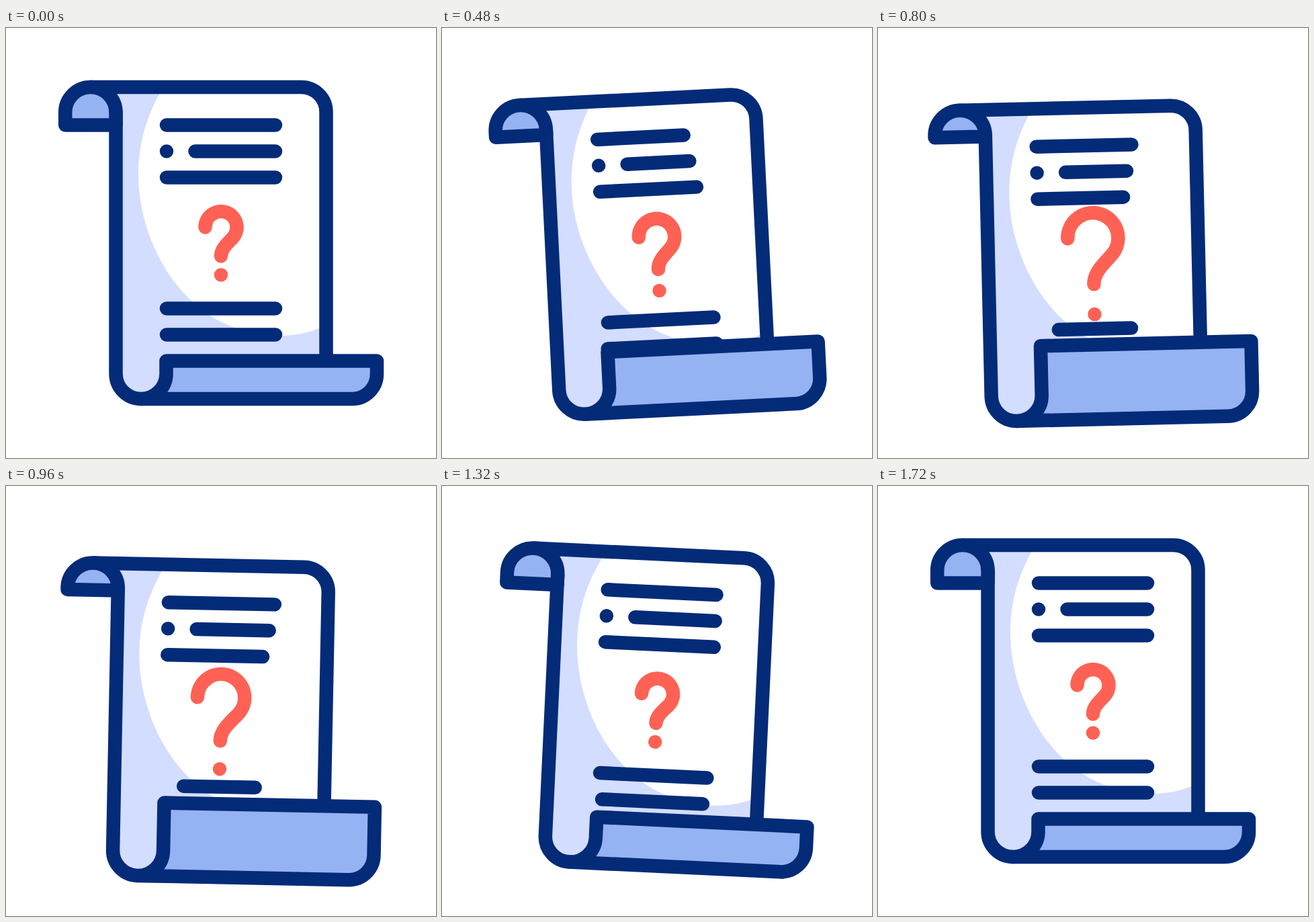
An HTML page for the animation above (1840 ms loop, 640x640 px).

```html
<!DOCTYPE html>
<html lang="en">
<head>
<meta charset="utf-8">
<title>Scroll quiz</title>
<style>
  html, body { margin: 0; height: 100%; overflow: hidden; background: #fff; }
  svg { display: block; width: 100%; height: 100%; }
  path { fill: none; stroke: #032b78; stroke-width: 20.5; stroke-linecap: round; stroke-linejoin: round; }
  .shade { fill: #d3ddff; stroke: none; }
  .curl { fill: #95b2f3; }
  #question { stroke: #ff6254; }
</style>
</head>
<body>
<svg viewBox="0 0 640 640">
  <g id="scroll">
    <path class="shade" id="shade"/>
    <path id="paper"/>
    <path id="line0"/>
    <path id="line1"/>
    <path id="line2"/>
    <path id="line3"/>
    <path id="line4"/>
    <path id="question" d="M296.5 296.5A23.5 23.5 0 1 1 336.8 313C328 322 320 329.5 320 339.5M320 367.5h0"/>
    <path class="curl" id="topCurl"/>
    <path class="curl" id="bottomRoll"/>
  </g>
</svg>
<script>
const STEP = 40, LOOP = 1840, LAST = 42;
const $ = id => document.getElementById(id);
const draw = (id, d) => $(id).setAttribute('d', d);

// Symmetric cubic-bezier(p, 0, 1 - p, 1)
function ease(x, p) {
  let lo = 0, hi = 1;
  for (let i = 0; i < 24; i++) {
    const t = (lo + hi) / 2, u = 1 - t;
    if (3 * p * t * u * u + 3 * (1 - p) * t * t * u + t * t * t < x) lo = t;
    else hi = t;
  }
  return lo * lo * (3 - 2 * lo);
}

function track(k, times, values, p) {
  if (k <= times[0]) return values[0];
  for (let i = 1; i < times.length; i++) {
    if (k < times[i]) {
      const x = (k - times[i - 1]) / (times[i] - times[i - 1]);
      return values[i - 1] + (values[i] - values[i - 1]) * ease(x, p);
    }
  }
  return values[values.length - 1];
}

// Out and back again, used for the staggered details
const pulse = (k, start) =>
  track(k, [start, start + 12, start + 12.5, start + 24.5], [0, 1, 1, 0], 1 / 3);

function render(k) {
  const angle = track(k, [0, 13, 29.3, 41.5], [0, -3, 3, 0], 0.42);
  const drop = track(k, [0, 21, 42], [0, 30.6, 0], 0.61);
  const unroll = track(k, [0.5, 19.5, 39.5], [0, 54.5, 0], 0.61);
  const rollTop = 495.5 - unroll;

  $('scroll').setAttribute('transform', `rotate(${angle} 320 320) translate(0 ${drop})`);

  draw('shade', `M126 88H234C209 130 197 172 197 218C197 290 229 362 275 405
    C310 440 360 458 408 458C429 458 449 454 466 447L476.5 442V${rollTop}H238.5V514.5
    A37.5 37.5 0 0 1 163.5 514.5V125.5A37.5 37.5 0 0 0 126 88Z`);
  draw('paper', `M126 88H439.5A37 37 0 0 1 476.5 125V${rollTop}M163.5 125.5V514.5
    A37.5 37.5 0 0 0 201 552`);
  draw('topCurl', `M163.5 ${144.5 - 0.31 * unroll}H88.2V125.5A37.6 37.5 0 0 1 163.5 125.5Z`);
  draw('bottomRoll', `M201 552A37.5 37.5 0 0 0 238.5 514.5V${rollTop}H552V515
    A37 37 0 0 1 515 552Z`);

  const right = start => 401 - 36 * pulse(k, start);
  draw('line0', `M239 144.5H${right(1)}`);
  draw('line1', `M239 183.5h0M281.5 183.5H${right(3)}`);
  draw('line2', `M239 222.5H${right(5)}`);
  [417.5, 456.5].forEach((y, i) => {
    const inset = 29 * pulse(k, 9 + 2 * i);
    draw('line' + (3 + i), `M${239 + inset} ${y}H${401 - inset}`);
  });

  const scale = 1 + 0.6 * pulse(k, 7.3);
  const question = $('question');
  question.setAttribute('transform',
    `translate(320 320.3) scale(${scale}) translate(-320 -320.3)`);
  question.style.strokeWidth = 20.5 / scale;
}

function tick() {
  const time = performance.now() % LOOP;
  render(Math.min(LAST, Math.max(0, Math.floor(time / STEP) - 1)));
  requestAnimationFrame(tick);
}
tick();
</script>
</body>
</html>
```
